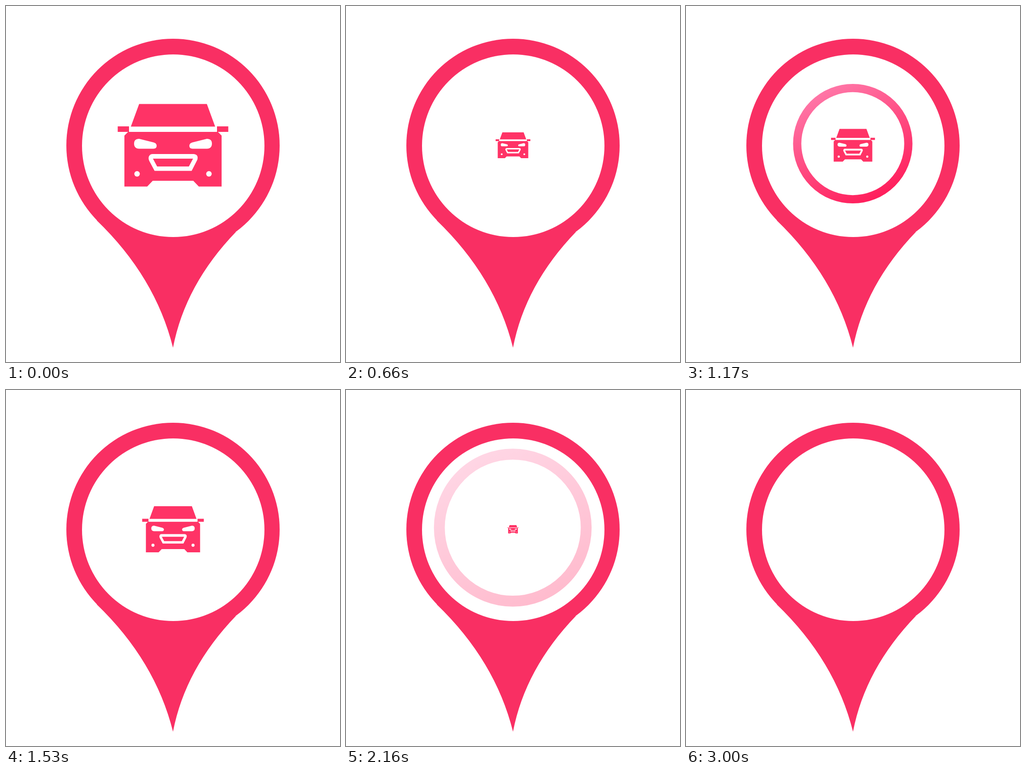
Recreate the animation shown at these times as an HTML page with a canvas. Size 725 by 772 pixels, loop 3.03 s.

```html
<!DOCTYPE html>
<html lang="zh">
<head>
<meta charset="utf-8">
<title>Map pin</title>
<style>
html, body { margin: 0; width: 100%; height: 100%; overflow: hidden; background: #fff; }
canvas { display: block; width: 725px; height: 772px; }
</style>
</head>
<body>
<canvas id="stage" width="725" height="772"></canvas>
<script>
const ctx = document.getElementById('stage').getContext('2d');

const LOOP = 3030, STEP = 30;
const SHRINK = 589, CYCLE = 815, PULSES = 3;
const TEXT_IN = CYCLE * 2 + SHRINK, TEXT_OUT = 2770, TEXT_END = 2996;
const PIN = '#f92f63', CAR = '#ff3366', LIGHT = '#ff75a6', DEEP = '#ff1f5c';

const clamp = v => Math.min(1, Math.max(0, v));
const span = (t, a, b) => clamp((t - a) / (b - a));

const pinTail = new Path2D('M197 465 Q324 587 362.5 741 Q389 604 499 490 L362 400 Z');

const carBody = new Path2D(
  'M289 212.5 H436 L454 261.5 H271 Z' +
  'M242.5 261 H267 V273 H242.5 Z M458 261 H482.5 V273 H458 Z' +
  'M265 273 H460 L468 281 V391.5 H418.5 L406.5 379 H318.5 L306.5 391.5 H257 V281 Z');
const headlight = new Path2D(
  'M289 288 L321 296 Q327 298 327 303 Q327 309.5 320 309.5 H289 Q278 309 278 298.5 Q278 288 289 288 Z');
const grille = new Path2D(
  'M318 321 H408 Q416 322 416 329 Q416 333 414 336 L403 357.5 H322.5 L311 336 Q309 332 309.5 329 Q311 321 318 321 Z');
const grilleInner = new Path2D('M319 331 H406 L397 348 H328 Z');

function disc(x, y, r, color) {
  ctx.fillStyle = color;
  ctx.beginPath();
  ctx.arc(x, y, r, 0, Math.PI * 2);
  ctx.fill();
}

function fillPath(path, color) {
  ctx.fillStyle = color;
  ctx.fill(path);
}

function pinkFade(x, y, dx, dy) {
  const g = ctx.createLinearGradient(x - dx, y - dy, x + dx, y + dy);
  g.addColorStop(0, LIGHT);
  g.addColorStop(1, DEEP);
  return g;
}

function scaled(s, x, y, draw) {
  if (s <= 0.005) return;
  ctx.save();
  ctx.translate(x, y);
  ctx.scale(s, s);
  ctx.translate(-x, -y);
  draw();
  ctx.restore();
}

function drawPin() {
  disc(362.5, 302.5, 231.5, PIN);
  fillPath(pinTail, PIN);
  disc(363, 303, 198, '#fff');
}

function drawCar() {
  fillPath(carBody, CAR);
  fillPath(headlight, '#fff');
  ctx.save();
  ctx.translate(725, 0);
  ctx.scale(-1, 1);
  fillPath(headlight, '#fff');
  ctx.restore();
  fillPath(grille, '#fff');
  fillPath(grilleInner, CAR);
  disc(284.5, 364, 6, '#fff');
  disc(440.5, 364, 6, '#fff');
}

function drawRing(p) {
  const x = 362, y = 298.5, r = 45.2 + 140 * p;
  ctx.save();
  ctx.globalAlpha = Math.min(span(p, 0, 0.33), 1 - span(p, 0.667, 1));
  ctx.strokeStyle = pinkFade(x, y, r * 0.45, r * 0.88);
  ctx.lineWidth = r * 0.138;
  ctx.beginPath();
  ctx.arc(x, y, r * 0.931, 0, Math.PI * 2);
  ctx.stroke();
  ctx.restore();
}

function drawText() {
  ctx.font = 'bold 103px "Noto Sans CJK SC", "Noto Sans CJK", sans-serif';
  ctx.textAlign = 'center';
  ctx.textBaseline = 'alphabetic';
  ctx.fillStyle = pinkFade(364, 305, 25, 46);
  ctx.fillText('车辆', 364, 345);
}

function render(t) {
  ctx.clearRect(0, 0, 725, 772);
  drawPin();
  const pulse = Math.floor(t / CYCLE), local = t - pulse * CYCLE;
  if (t < TEXT_IN && pulse < PULSES) {
    const shrinking = local < SHRINK;
    const p = local / SHRINK;
    if (shrinking) drawRing(p);
    scaled(shrinking ? 1 - p : span(local, SHRINK, CYCLE), 362.5, 302, drawCar);
  } else {
    const s = Math.min(span(t, TEXT_IN, CYCLE * PULSES), 1 - span(t, TEXT_OUT, TEXT_END));
    scaled(s, 363, 303, drawText);
  }
}

const start = performance.now();
function tick() {
  const t = (performance.now() - start) % LOOP;
  render(Math.floor(t / STEP) * STEP);
  requestAnimationFrame(tick);
}
tick();
</script>
</body>
</html>
```
